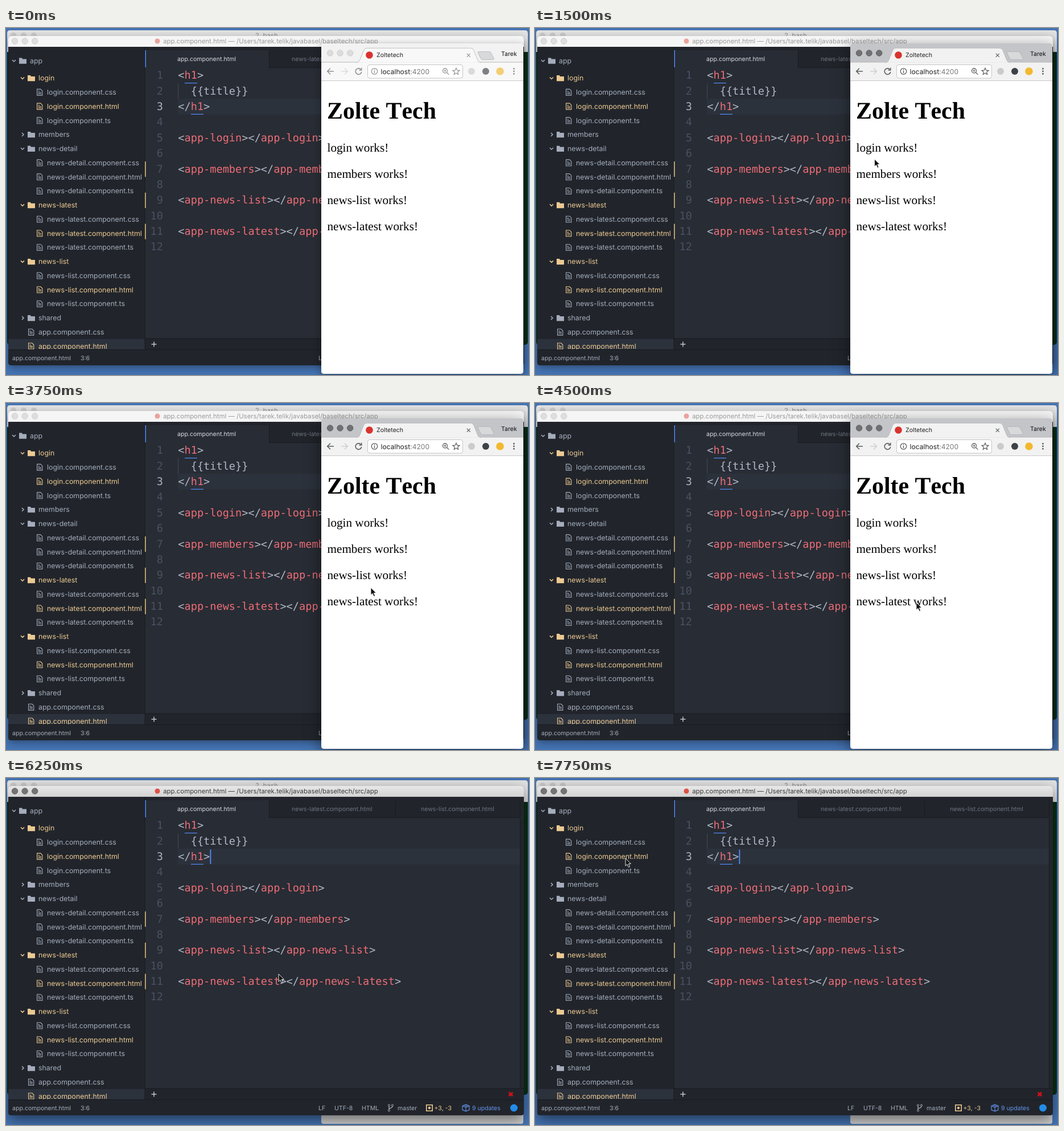
An HTML page that plays this animation: 919 by 609 pixels, repeating every 8000 ms.

```html
<!DOCTYPE html>
<html lang="en">
<head>
<meta charset="utf-8">
<title>Editor and browser</title>
<style>
  html, body { margin: 0; width: 100%; height: 100%; overflow: hidden; background: #4574b4; }
  svg { display: block; width: 919px; height: 609px; }
  text { font-family: Inter, Roboto, sans-serif; text-rendering: geometricPrecision; }
  .code { font: 18.6px "DejaVu Sans Mono", "Liberation Mono", monospace; }
  .page { font-family: "Liberation Serif", "Noto Serif", serif; font-kerning: none; }

  /* Window focus */
  .editor-bar { fill: #f5f5f5; }
  .editor-title { fill: #9b9b9b; }
  .editor-lights { fill: #dedede; stroke: #cfcfcf; }
  .editor-logo { opacity: .5; }
  .editor-shadow { filter: drop-shadow(0 4px 7px rgba(0, 0, 0, .35)); }
  .browser-strip { fill: #f2f2f2; }
  .browser-bar { fill: #f8f8f8; }
  .browser-lights { fill: #dcdcdc; stroke: #cecece; }
  .browser-icons { opacity: .65; }
  .browser-shadow { filter: drop-shadow(0 4px 7px rgba(0, 0, 0, .4)); }
  .caret { visibility: hidden; }
  .browser-front .browser-strip { fill: #c3c5c9; }
  .browser-front .browser-bar { fill: #f2f2f2; }
  .browser-front .browser-lights { fill: #717173; stroke: #626264; }
  .browser-front .browser-icons { opacity: 1; }
  .browser-front .browser-shadow { filter: drop-shadow(0 8px 14px rgba(0, 0, 0, .5)); }
  .editor-front .editor-shadow { filter: drop-shadow(0 8px 12px rgba(0, 0, 0, .5)); }
  .editor-front .editor-bar { fill: url(#bar); }
  .editor-front .editor-title { fill: #3c3c3c; }
  .editor-front .editor-lights { fill: #747474; stroke: #656565; }
  .editor-front .editor-logo { opacity: 1; }
  .editor-front .caret { visibility: visible; }
  .editor-front .browser { visibility: hidden; }
</style>
</head>
<body>
<script>
const GREY = "#a5adbc", GOLD = "#ecc993", RED = "#ec6d77", BLUE = "#528bff";
const PANEL = "#21252b", EDITOR = "#282c34", EDGE = "#181a1f", LIT = "#2c323c";

const escapeText = s => s.replace(/&/g, "&amp;").replace(/</g, "&lt;");
const text = (x, y, s, size, fill, extra = "") =>
  `<text x="${x}" y="${y}" font-size="${size}" fill="${fill}" ${extra}>${escapeText(s)}</text>`;
const rect = (x, y, w, h, fill, extra = "") =>
  `<rect x="${x}" y="${y}" width="${w}" height="${h}" fill="${fill}" ${extra}/>`;
const circle = (x, y, r, fill, extra = "") =>
  `<circle cx="${x}" cy="${y}" r="${r}" fill="${fill}" ${extra}/>`;
const line = (d, stroke, width = 1.3, extra = "") =>
  `<path d="${d}" fill="none" stroke="${stroke}" stroke-width="${width}" ${extra}/>`;
const lights = (x, y, name) => `<g class="${name}">` +
  [0, 17.6, 35.2].map(dx => `<circle cx="${x + dx}" cy="${y}" r="5.2"/>`).join("") + "</g>";

function desktop() {
  return rect(0, 0, 919, 609, "#4574b4") +
    rect(2, 4, 915, 552, "#0a3016", 'rx="5"') +
    `<path d="M2 42V9q0-5 5-5H912q5 0 5 5V42Z" fill="#e2e2e2"/>` +
    [13, 31, 49].map(x => circle(x, 13, 5.2, "#cbcbcb")).join("") +
    text(438, 17, "2. bash", 11.4, "#8d8d8d") +
    rect(554, 400, 355, 207, "#d2d2d2", 'rx="4"');
}

// Tree entries: depth, label, gold when changed; folders carry "open" or "shut".
const files = (name, gold) => ["css", "html", "ts"].map(ext =>
  [2, `${name}.component.${ext}`, gold && ext === "html"]);
const tree = [
  [1, "login", true, "open"], ...files("login", true),
  [1, "members", false, "shut"],
  [1, "news-detail", false, "open"], ...files("news-detail", false),
  [1, "news-latest", true, "open"], ...files("news-latest", true),
  [1, "news-list", true, "open"], ...files("news-list", true),
  [1, "shared", false, "shut"],
  [1, "app.component.css", false], [1, "app.component.html", true],
];

function treeRow([depth, label, gold, folder], y) {
  const x = 42 + depth * 15, color = gold ? GOLD : GREY;
  let icon;
  if (folder) {
    const chevron = folder === "open" ? `M${x - 31} ${y - 1.5}l3 3 3-3` : `M${x - 29} ${y - 3}l3 3-3 3`;
    icon = line(chevron, color, 1.5) +
      `<path d="M${x - 19} ${y - 5}h5l1 2h7v8.3h-13z" fill="${color}"/>`;
  } else {
    icon = `<g transform="translate(${x - 18} ${y - 6})">` +
      line("M.6.6H6.8L9.8 3.6V11.4H.6Z M2.5 4H5 M2.5 6.2H8 M2.5 8.6H8", color, 1.1) + "</g>";
  }
  return icon + text(x, y + 4.3, label, 12.38, color);
}

function sidebar() {
  return rect(4, 33, 240, 531, PANEL) +
    `<g clip-path="url(#side)">` + rect(4, 546, 240, 20, LIT) +
    treeRow([0, "app", false, "open"], 57.5) +
    tree.map((row, i) => treeRow(row, 88 + i * 24.76)).join("") + "</g>" +
    rect(243.5, 33, 1, 531, EDGE);
}

const source = ["<h1>", "  {{title}}", "</h1>", "", "<app-login></app-login>", "",
  "<app-members></app-members>", "", "<app-news-list></app-news-list>", "",
  "<app-news-latest></app-news-latest>", ""];

function codeLine(s, i) {
  const y = 89.3 + i * 27.37, indent = s.length - s.trimStart().length;
  const parts = s.trim().split(/([a-z][a-z0-9-]*)/).map((part, k) =>
    `<tspan fill="${k % 2 && s.includes("<") ? RED : "#b1b8c5"}">${escapeText(part)}</tspan>`);
  return `<text class="code" x="276" y="${y}" text-anchor="end" fill="${i === 2 ? "#abb2bf" : "#495162"}">${i + 1}</text>` +
    `<text class="code" x="${302.3 + indent * 11.2}" y="${y}">${parts.join("")}</text>`;
}

function tabs() {
  return rect(244, 33, 666, 36, PANEL) + rect(244, 39, 218, 31, EDITOR) +
    rect(462, 69, 441, 1, EDGE) +
    [462, 684, 903].map(x => rect(x, 39, 1, 30, EDGE)).join("") +
    rect(244, 39, 2, 30, BLUE) +
    text(301, 57.5, "app.component.html", 10.57, "#d7dae0") +
    text(502, 57.5, "news-latest.component.html", 10.5, "#6e7480") +
    text(729, 57.5, "news-list.component.html", 10.5, "#6e7480");
}

function statusBar() {
  const label = (x, s, fill = GREY) => text(x, 582.8, s, 10.57, fill);
  return `<path d="M4 564H910V587q0 5-5 5H9q-5 0-5-5Z" fill="${PANEL}"/>` + rect(4, 564, 906, 1, EDGE) +
    label(11, "app.component.html") + label(131, "3:6") + label(549, "LF") +
    label(577, "UTF-8") + label(625, "HTML") + label(688, "master") +
    line("M673 576V582M679 576q0 3-6 4", GREY, 1.3) +
    [[673, 574.5], [673, 583.5], [679, 574.5]].map(([x, y]) => circle(x, y, 1.6, PANEL, `stroke="${GREY}"`)).join("") +
    line("M738.8 573.8h10.4v10.4h-10.4z", GOLD, 1.6) + circle(744, 579, 2.2, GOLD) +
    label(752.5, "+3, -3", GOLD) +
    line("M802 575.5l6-2.3 6 2.3v7l-6 2.3-6-2.3zM802 575.5l6 2.3 6-2.3M808 577.8v7M805 574.3l6 2.3", "#6494ed", 1.1) +
    label(819, "9 updates", "#6494ed") + circle(892.5, 579, 6.5, "#248be8");
}

function editor() {
  return rect(4, 14, 906, 578, PANEL, 'rx="5" class="editor-shadow"') +
    `<path class="editor-bar" d="M4 33V19q0-5 5-5H905q5 0 5 5V33Z"/>` +
    lights(15.5, 23, "editor-lights") +
    circle(266, 23, 4.5, "#dd5144", 'class="editor-logo"') +
    `<text class="editor-title" x="276.2" y="27" font-size="11.4">app.component.html — /Users/tarek.telik/javabasel/baseltech/src/app</text>` +
    rect(244, 69, 666, 476, EDITOR) + tabs() + rect(903, 70, 7, 475, PANEL) + rect(903, 70, 1, 475, EDGE) +
    rect(302, 124, 601, 27.5, LIT) + rect(302, 97, 1, 27, "#434954") +
    source.map(codeLine).join("") +
    rect(314, 96, 22, 1.2, BLUE) + rect(325, 150.8, 22, 1.2, BLUE) +
    rect(358.5, 125.5, 1.8, 25.5, BLUE, 'class="caret"') +
    rect(244, 545, 666, 19, PANEL) + rect(244, 544.5, 666, 1, EDGE) +
    line("M255.5 555h9M260 550.5v9", "#c0c5ce", 1.5) +
    line("M883.7 551.7l6.6 6.6M890.3 551.7l-6.6 6.6", "#d80f16", 2.8) +
    sidebar() +
    [6, 8, 10].map(i => rect(244, 70 + i * 27.37, 1.8, 27, "#c9ad74")).join("") +
    statusBar();
}

function browserIcons() {
  const ink = "#5b5c5e";
  return line("M576 76H565M570 70.7L564.7 76l5.3 5.3", ink, 1.6) +
    line("M589 76h11M595 70.7l5.3 5.3-5.3 5.3", "#cfcfcf", 1.6) +
    line("M623.5 72.7a5.3 5.3 0 1 0 1.2 4.3M624.7 69.8v4.2h-4.2", ink, 1.6) +
    circle(647.5, 76, 5.2, "none", `stroke="${ink}" stroke-width="1.3"`) +
    line("M647.5 75v4M647.5 72.6v1.3", ink, 1.4) +
    circle(771.5, 75, 4, "none", `stroke="${ink}" stroke-width="1.3"`) +
    line("M774.5 78l3.8 3.8M769.5 75h4M771.5 73v4", ink, 1.2) +
    line("M791 70.2l1.7 4 4.3.3-3.3 2.8 1 4.2-3.7-2.3-3.7 2.3 1-4.2-3.3-2.8 4.3-.3z", ink, 1.2) +
    circle(818, 76, 6, "#cbcbcb") + circle(843, 76, 6, "#3c4248") + circle(868, 76, 6.8, "#f2b92f") +
    [71.5, 76, 80.5].map(y => circle(892.5, y, 1.4, ink)).join("") +
    line("M809.8 44.8l6 6M815.8 44.8l-6 6", ink, 1.2);
}

function browser() {
  const note = (s, i) => text(564.5, 217 + i * 46, s, 21.2, "#000", 'class="page"');
  return `<g class="browser">` +
    rect(554, 27, 355, 580, "#fff", 'rx="5" class="browser-shadow"') +
    `<path class="browser-strip" d="M554 62V32q0-5 5-5H904q5 0 5 5V62Z"/>` +
    `<rect class="browser-bar" x="554" y="60" width="355" height="32"/>` + rect(554, 92, 355, 1, "#c8c8c8") +
    line("M554 60H909", "#b8b8b9", 1) +
    `<path class="browser-bar" d="M616 60.8q4-.5 5.5-4l7-17.5q1.5-4 6-4H816q4.5 0 6 4l7 17.5q1.5 3.5 5 4Z" stroke="#b4b4b6" stroke-width=".8"/>` +
    `<rect class="browser-bar" x="617" y="60.2" width="216" height="2"/>` +
    `<path d="M831 41.5h18q2.5 0 3.5 2.5l4.5 9q1 2.5-1.5 2.5h-18q-2.5 0-3.5-2.5l-4.5-9q-1-2.5 1.5-2.5Z" fill="#d8d9da" stroke="#b0b0b2" stroke-width=".8"/>` +
    lights(569.5, 44, "browser-lights") + circle(638.5, 47.5, 6.3, "#d9332f") +
    text(651, 51.3, "Zoltetech", 10.6, "#222") + text(870, 48.8, "Tarek", 10.6, "#111") +
    rect(635.5, 64.5, 167, 23.5, "#fff", 'rx="3.5" stroke="#c6c6c6"') +
    `<text x="658.5" y="80.5" font-size="12.1" fill="#222">localhost<tspan fill="#777">:4200</tspan></text>` +
    `<g class="browser-icons">${browserIcons()}</g>` +
    text(564, 159.2, "Zolte Tech", 41.9, "#000", 'class="page" font-weight="bold"') +
    ["login", "members", "news-list", "news-latest"].map((s, i) => note(s + " works!", i)).join("") +
    "</g>";
}

document.body.innerHTML = `<svg viewBox="0 0 919 609"><defs>
  <linearGradient id="bar" x2="0" y2="1"><stop stop-color="#e8e8e8"/><stop offset="1" stop-color="#d2d2d2"/></linearGradient>
  <clipPath id="side"><rect x="4" y="33" width="240" height="531"/></clipPath></defs>
  ${desktop()}${editor()}${browser()}
  <path id="pointer" d="M0 0V13.2L3 10.4 5.3 15.5 7.6 14.5 5.3 9.6H9.5Z" fill="#111" stroke="#fff" stroke-width=".9"/></svg>`;

const svg = document.querySelector("svg"), pointer = document.getElementById("pointer");
const LOOP = 8000, STEP = 250;

// Pointer path: time, x, y
const path = [
  [500, 792, 196], [750, 778, 208], [1250, 623, 217], [1750, 570, 243], [2000, 556, 254],
  [2500, 578, 268], [2750, 571, 272], [3250, 630, 306], [3500, 656, 318], [3750, 641, 324],
  [4000, 604, 338], [4250, 584, 349], [4500, 670, 350], [5250, 670, 350], [5500, 560, 346],
  [5750, 475, 342], [6250, 479, 344], [6500, 458, 333], [7000, 300, 220], [7500, 167, 146],
  [7750, 159, 141],
];

function pointerAt(t) {
  const next = path.findIndex(key => key[0] >= t);
  const [t1, x1, y1] = path[next], [t0, x0, y0] = path[Math.max(0, next - 1)];
  const k = t1 > t0 ? (t - t0) / (t1 - t0) : 1;
  return [x0 + (x1 - x0) * k, y0 + (y1 - y0) * k];
}

function draw(now) {
  const t = Math.floor(now % LOOP / STEP) * STEP;
  svg.setAttribute("class", t < 250 ? "" : t < 6250 ? "browser-front" : "editor-front");
  pointer.setAttribute("visibility", t < path[0][0] ? "hidden" : "visible");
  pointer.setAttribute("transform", `translate(${pointerAt(t)})`);
  requestAnimationFrame(draw);
}
draw(performance.now());
</script>
</body>
</html>
```
